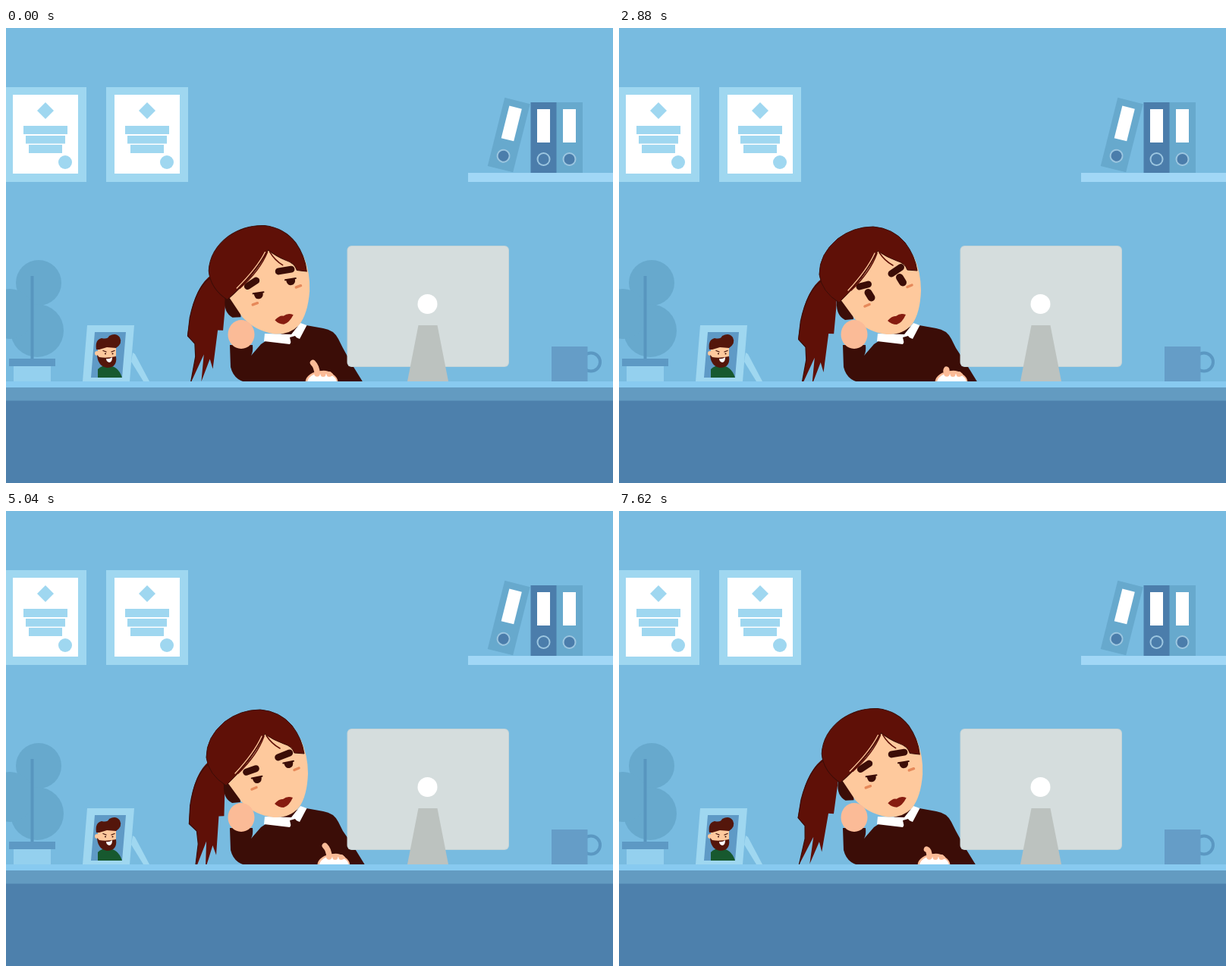
These frames come from a looping animation (800 px wide and 600 px high, 7.65 s). An HTML page with a canvas:

```html
<!DOCTYPE html>
<html lang="en">
<head>
<meta charset="utf-8">
<title>Office desk</title>
<style>
html, body { margin: 0; width: 100%; height: 100%; overflow: hidden; background: #77bbe0; }
canvas { display: block; width: 800px; height: 600px; }
</style>
</head>
<body>
<canvas id="stage" width="800" height="600"></canvas>
<script>
const ctx = document.getElementById('stage').getContext('2d');
const LOOP = 7650;
const DARK = '#3b0d07', HAIR = '#5f1007', SKIN = '#fec99d', PEACH = '#fbbb97';
const PALE = '#9fd7f0', LEAF = '#67a9cd', NAVY = '#4b7dab';

const fill = (d, color) => { ctx.fillStyle = color; ctx.fill(new Path2D(d)); };
const rect = (x, y, w, h, color) => { ctx.fillStyle = color; ctx.fillRect(x, y, w, h); };
const disc = (x, y, r, color, ry = r) => {
  ctx.fillStyle = color;
  ctx.beginPath();
  ctx.ellipse(x, y, r, ry, 0, 0, Math.PI * 2);
  ctx.fill();
};
const stroke = (d, color, width) => {
  ctx.strokeStyle = color;
  ctx.lineWidth = width;
  ctx.lineCap = ctx.lineJoin = 'round';
  ctx.stroke(new Path2D(d));
};
const line = (p, color, width) => stroke(`M${p[0]} ${p[1]}L${p[2]} ${p[3]}`, color, width);
const group = (x, y, angle, draw) => {
  ctx.save();
  ctx.translate(x, y);
  ctx.rotate(angle);
  draw();
  ctx.restore();
};
const mix = (a, b, k) => a + (b - a) * k;
const mixAll = (a, b, k) => a.map((v, i) => mix(v, b[i], k));
const smooth = k => k * k * (3 - 2 * k);

// keys: [time, value] pairs, eased from one to the next
function track(keys, t) {
  const i = keys.findIndex(k => k[0] > t);
  if (i < 0) return keys[keys.length - 1][1];
  if (i === 0) return keys[0][1];
  const [t0, a] = keys[i - 1], [t1, b] = keys[i];
  return mix(a, b, smooth((t - t0) / (t1 - t0)));
}

const TILT = [[0, .045], [1350, -.034], [2880, 0], [5790, 0], [6870, -.034], [7620, .045]];
const PONY = [[0, -.035], [1350, -.075], [2880, .012], [4260, -.105], [5790, 0], [6870, -.08], [7620, .01]];
const MOUSE = [[0, 416], [1350, 417], [2880, 438], [4260, 438], [5790, 426], [6870, 405], [7620, 415]];
const ELBOW = [[0, 470], [1350, 470], [2880, 472], [5790, 473], [6870, 463], [7620, 470]];
const ALERT = [[2080, 0], [2240, 1], [4950, 1], [5110, 0]];
const SQUINT = [[3300, 0], [3600, 1], [4950, 1], [5110, 0]];

function certificate(x) {
  rect(x - 2, 78, 108, 125, PALE);
  rect(x + 9, 88, 86, 104, '#fff');
  fill(`M${x + 52} 98l11 11l-11 11l-11 -11z`, PALE);
  rect(x + 23, 129, 58, 11, PALE);
  rect(x + 26, 142, 52, 10.5, PALE);
  rect(x + 30, 154, 44, 11, PALE);
  disc(x + 78, 177, 9, PALE);
}

function binder(x, y, angle, color) {
  group(x, y, angle, () => {
    rect(-17, -46.5, 34.5, 93, color);
    rect(-8.5, -37.5, 17, 44, '#fff');
    disc(0, 28.5, 9, '#9cc6e0');
    disc(0, 28.5, 7, NAVY);
  });
}

function room() {
  rect(0, 0, 800, 600, '#78bbe0');
  certificate(0);
  certificate(134);
  binder(662.5, 141, .245, LEAF);
  binder(708.5, 144.5, 0, NAVY);
  binder(742.5, 144.5, 0, LEAF);
  rect(609, 191, 191, 12, '#a1d7f6');

  disc(43, 336, 30, LEAF);
  disc(41, 399, 35, LEAF);
  disc(5, 377, 33, LEAF);
  rect(32.5, 327, 4, 110, '#5896bf');
  rect(10, 446, 49, 20, '#94d0ee');
  rect(4, 436, 61, 10, '#5d99c4');
}

function portrait() {
  fill('M167 428L170 430L189 466H181L165 440z', PALE);
  fill('M107 392H169L163 466H101z', PALE);
  fill('M117 401H158L153 461H112z', '#5f9ac6');
  fill('M121 461V450Q126 445 133 445Q148 445 153 461z', '#17592f');
  fill('M121 418H145V431Q143 444 132 444Q121 441 121 430z', SKIN);
  disc(120, 429, 3, SKIN);
  fill('M120 431L123 434Q132 436 145 433Q147 448 133 448Q121 446 120 431z', '#54160b');
  fill('M132 436Q136 437 140 434Q140 441 136 441Q132 440 132 436z', '#fff');
  fill('M119 424Q117 411 126 409Q134 411 136 406Q145 401 150 408Q154 416 145 422L133 421L123 424z', '#54160b');
  line([128, 425.5, 132, 427], DARK, 1.3);
  line([139, 427, 143, 425.5], DARK, 1.3);
  disc(131, 429.5, 1, DARK);
  disc(140.5, 429.5, 1, DARK);
}

function monitor() {
  ctx.fillStyle = '#c5d4d7';
  ctx.beginPath();
  ctx.roundRect(449.5, 287, 213.5, 160, 6);
  ctx.fill();
  ctx.fillStyle = '#d5dddd';
  ctx.beginPath();
  ctx.roundRect(450.5, 288, 211.5, 158, 5);
  ctx.fill();
  fill('M543.5 392H568.5L583 466H529z', '#bcc2bf');
  disc(555.5, 364, 13, '#fff');
}

function mug() {
  ctx.strokeStyle = '#5b98c2';
  ctx.lineWidth = 4;
  ctx.beginPath();
  ctx.arc(771, 440.5, 12, 0, Math.PI * 2);
  ctx.stroke();
  rect(719, 420, 47.5, 46, '#659dc7');
}

function desk() {
  rect(0, 466, 800, 8, '#88caf0');
  rect(0, 474, 800, 18, '#639bc1');
  rect(0, 491.5, 800, 109, '#4d80ac');
}

function body(elbow) {
  fill('M295 418L325 418Q326 427 323 432L336 417L342 413L390 391L418 396'
    + `Q432 398 438 410L444 422L${elbow - 15} 442L${elbow + 1} 468H325Q301 468 296 447z`, DARK);
  fill('M341 403L376 404L388 389L396.5 392L387 410L380 407L374 417L340 413z', '#fff');
  fill('M374 408L381 406L385 411L381 418L376 417z', DARK);
}

// lidded or fully open
function eye(x, y, open) {
  if (open) {
    line([x - 2.5, y - 4, x + 1.5, y + 2.5], DARK, 10);
    return;
  }
  group(x, y, -.2, () => {
    line([-7, -2, 7, -2], DARK, 2);
    fill('M-6 -2H6Q6 6 0 6Q-6 6 -6 -2z', DARK);
  });
}

function face(alert, squint) {
  const brows = [
    [[316, 343, 327, 335], [356, 321.5, 372.5, 318]],
    [[317, 341, 328.5, 338], [359, 324, 371.5, 315.5]],
    [[317, 347.5, 332, 345], [361, 328.5, 376, 322]]
  ];
  eye(331, 353, alert > .5);
  eye(372.5, 333, alert > .5);
  for (const side of [0, 1]) {
    const p = mixAll(mixAll(brows[0][side], brows[1][side], alert), brows[2][side], squint);
    line(p, DARK, 9);
  }
  line([324, 367, 330, 364.5], '#e6895a', 3.5);
  line([380, 341.5, 386, 339], '#e6895a', 3.5);
  fill('M354 386Q360 379 365 380Q371 375 378 378Q373 389 366 391Q359 391 354 386z', '#861c10');
}

function ponytail() {
  fill('M268 330Q248 344 240 387L237 411L247 421L248 438L242 473L259 435L256 471'
    + 'L267 441L271 454L277 403L284 403L287 365L286 332z', HAIR);
  stroke('M266 334Q248 347 240 387L237.5 411L247 421L248 438L242 473', DARK, 1.2);
}

function head(t) {
  group(371, 394, track(TILT, t), () => {
    ctx.translate(-371, -394);
    group(270, 335, track(PONY, t), () => {
      ctx.translate(-270, -335);
      ponytail();
    });
    fill('M284 350L306 350L309 384L298 385Q286 379 287 362z', DARK);
    fill('M340 288L388 300Q398 322 398 346Q397 376 386 391Q374 405 353 404'
      + 'Q328 401 311 384L292 358L320 318z', SKIN);
    face(track(ALERT, t), track(SQUINT, t));
    const cap = 'M290 362Q267 348 264 325Q264 298 288 278Q309 262 335 262Q361 264 377 283'
      + 'Q390 300 393 320L380 319Q377 310 366 307Q352 302 341 294Q325 329 290 362z';
    fill(cap, HAIR);
    stroke(cap, DARK, 1);
    stroke('M340 297Q331 322 306 346', HAIR, 1.6);
    stroke('M343 296Q350 307 361 313', HAIR, 1.6);
    stroke('M337 297Q327 319 302 346', SKIN, 1.3);
  });
}

function fist() {
  disc(310, 404, 17.5, PEACH, 19);
}

// quick click of the finger, at an even pace
function press(t) {
  const pace = 1175;
  const gap = Math.abs((t - 530 + pace * 1.5) % pace - pace / 2);
  return 1 - smooth(Math.min(1, gap / 75));
}

function mouse(x, down) {
  disc(x, 467, 21.5, PEACH, 14.5);
  disc(x + .5, 468, 19.5, '#fff', 13.5);
  const tip = mixAll([x - 11.5, 441.5], [x - 7, 452], down);
  stroke(`M${tip[0]} ${tip[1]}Q${x - 6} 447 ${x - 6} 456`, PEACH, 7.5);
  stroke(`M${x - 7} 456Q${x + 4} 451 ${x + 13} 457`, PEACH, 4);
  disc(x + 2, 456.5, 3.5, PEACH);
  disc(x + 10, 456.5, 3.5, PEACH);
}

function draw(t) {
  room();
  portrait();
  body(track(ELBOW, t));
  head(t);
  fist();
  mouse(track(MOUSE, t), press(t));
  monitor();
  mug();
  desk();
}

const start = performance.now();
function tick() {
  draw((performance.now() - start) % LOOP);
  requestAnimationFrame(tick);
}
tick();
</script>
</body>
</html>
```
